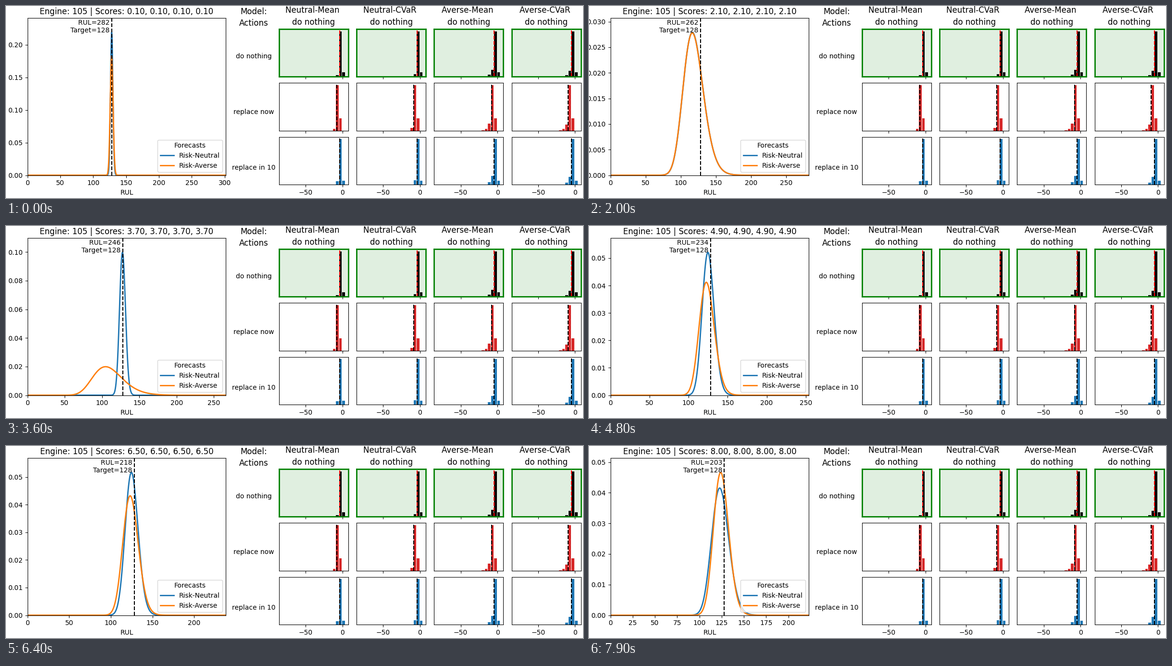
Animation, 1200 px wide and 400 px high, one loop 8 s. Source, as a matplotlib script:

```python
import matplotlib.pyplot as plt
import numpy as np
from matplotlib.animation import FuncAnimation

W, H, DPI = 1200, 400, 100
FRAMES, INTERVAL = 80, 100
TARGET, START_RUL = 128, 282

# Key points of the log-normal spread; the curves follow from it
STEPS = [0, 20, 36, 48, 57, 71, 79]
SPREADS = {
    "Risk-Neutral": [.0142, .122, .0314, .0613, .1102, .0347, .078],
    "Risk-Averse": [.017, .1225, .188, .0787, .2675, .0209, .0689],
}

MODELS = ["Neutral-Mean", "Neutral-CVaR", "Averse-Mean", "Averse-CVaR"]
ACTIONS = [
    dict(name="do nothing", color="black", line="red",
         shift=0, best=.1, spill=0, reach=2, mean=-3.65, cvar=.35),
    dict(name="replace now", color="tab:red", line="black",
         shift=1, best=.27, spill=0, reach=3, mean=-7.4, cvar=1.15),
    dict(name="replace in 10", color="tab:blue", line="black",
         shift=0, best=.09, spill=.035, reach=2, mean=-3.65, cvar=.35),
]
BIN, LAST_BIN = 4.28, 1.68

fig = plt.figure(figsize=(W / DPI, H / DPI), dpi=DPI, facecolor="white")


def add_axes(left, top, width, height):
    return fig.add_axes([left / W, 1 - (top + height) / H, width / W, height / H])


def label(x, baseline, text, size=12):
    fig.text(x / W, 1 - baseline / H, text, size=size, ha="center", va="baseline")


def rewards(action, averse, cvar):
    """Bar heights from the best outcome down a geometric tail."""
    first = .04 + .115 * averse + (-.025 if averse else .02) * cvar
    reach = action["reach"] if averse else 1
    tail = (first + action["spill"]) * .27 ** np.arange(reach)
    return np.array([action["best"], 1, *tail])


def draw_panel(row, col):
    action = ACTIONS[row]
    averse, cvar = divmod(col, 2)
    ax = add_axes(568 + 161.2 * col, 47.8 + 112.4 * row, 144, 99.5)
    bars = rewards(action, averse, cvar)
    centers = LAST_BIN - BIN * (np.arange(len(bars)) + action["shift"])
    ax.bar(centers, bars, width=.85 * BIN, color=action["color"])
    ax.axvline(action["mean"] - .65 * averse - action["cvar"] * cvar,
               color=action["line"], ls="--")
    ax.set(xlim=(-86.1, 8.1), ylim=(0, 1.05), xticks=[-50, 0], yticks=[])
    ax.tick_params(labelbottom=row == 2)
    if row == 0:
        ax.set_title(f"{MODELS[col]} \ndo nothing", linespacing=1.5)
        ax.set_facecolor((0, .5, 0, .12))
        for spine in ax.spines.values():
            spine.set(color="green", linewidth=2)


label(515, 17, "Model:")
label(515, 41, "Actions")
for row, action in enumerate(ACTIONS):
    label(515, 109 + 116 * row, action["name"], 10)
    for col in range(len(MODELS)):
        draw_panel(row, col)

main = add_axes(44.6, 25.3, 412.7, 327.2)
curves = {name: main.plot([], [], lw=2, label=name)[0] for name in SPREADS}
main.axvline(TARGET, color="black", ls="--")
main.set_xlabel("RUL")
main.legend(title="Forecasts", loc="lower right")
title = main.set_title("")
note = main.text(TARGET, .947, "", ha="right", va="center",
                 transform=main.get_xaxis_transform())


def forecast(x, spread):
    """Log-normal density whose mode drops as the spread grows."""
    mode = 128.5 / (1 + 4.6 * spread ** 1.8)
    peak = np.exp(-spread ** 2 / 2) / (np.sqrt(2 * np.pi) * mode * spread)
    return peak * np.exp(-np.log(x / mode) ** 2 / (2 * spread ** 2))


def update(i):
    rul = START_RUL - i
    xmax = rul + 20
    x = np.linspace(.01, xmax, 1200)
    top = 0
    for name, spreads in SPREADS.items():
        spread = np.exp(np.interp(i, STEPS, np.log(spreads)))
        y = forecast(x, spread)
        curves[name].set_data(x, y)
        top = max(top, y.max())
    main.set(xlim=(0, xmax), ylim=(0, 1.1 * top))
    scores = ", ".join([f"{(i + 1) / 10:.2f}"] * len(MODELS))
    title.set_text(f"Engine: 105 | Scores: {scores}")
    note.set_text(f"RUL={rul} \nTarget={TARGET} ")
    return [*curves.values(), title, note]


anim = FuncAnimation(fig, update, frames=FRAMES, interval=INTERVAL, repeat=True)
plt.show()
```
